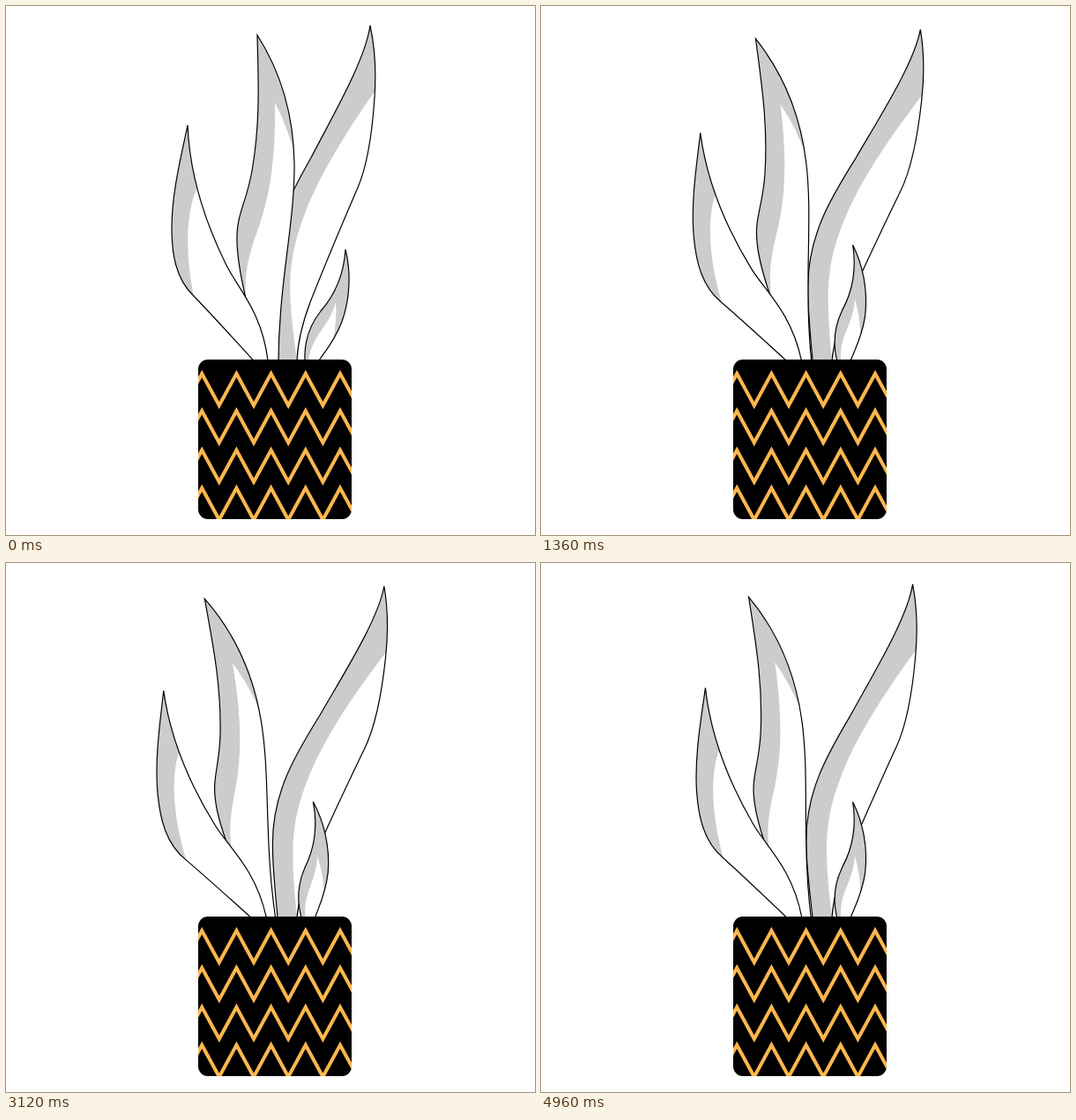
These frames come from a looping animation (600x600 px, 5 s). An HTML page:

```html
<!DOCTYPE html>
<html lang="en">
<head>
<meta charset="utf-8">
<title>Swaying plant</title>
<style>
  html, body { margin: 0; width: 100%; height: 100%; overflow: hidden; background: #fff; }
  svg { display: block; width: 100vw; height: 100vh; }
  .shade { fill: #ccc; }
  .light { fill: #fff; }
  .line { fill: none; stroke: #000; stroke-width: 1.2; }
  .zigzag { fill: none; stroke: #ffb74d; stroke-width: 4; stroke-miterlimit: 10; }
</style>
</head>
<body>
<svg viewBox="0 0 600 600">
  <defs>
    <clipPath id="pot"><rect x="218" y="401" width="174" height="181" rx="11"/></clipPath>
  </defs>
  <g id="leaves"></g>
  <g id="vase" clip-path="url(#pot)"><rect x="218" y="401" width="174" height="181"/></g>
</svg>
<script>
const LOOP = 5000, STEP = 40;

// Back to front. Each leaf swings linearly to `angle` at `peak` ms and back by `period` ms.
const leaves = [
  {
    pivot: [320, 402], angle: 3.2, peak: 1165, period: 2245,
    outline: 'M413 22C418 45 420 75 418 104C415 150 408 185 399 206C380 250 360 298 345 336' +
      'C336 360 331 380 330 402L330 410L309 410C306 385 300 350 299 320' +
      'C296 262 320 218 346 172C372 122 408 60 413 22Z',
    light: 'M418 97C383 147 352 198 337 241C317 295 320 330 330 402L420 402L440 97Z'
  },
  {
    pivot: [304, 424], angle: -9.1, peak: 1010, period: 2076,
    outline: 'M285 33C306 66 326 115 327 178C328 250 307 320 309 424L297 424' +
      'C285 380 261 305 262 262C262 235 273 222 279 187C289 130 286 80 285 33Z',
    light: 'M305 110C306 175 299 215 287 250C276 280 270 300 272 332L290 430L340 430' +
      'L345 164L326 164C321 144 313 125 305 110Z'
  },
  {
    pivot: [292, 420], angle: -6.5, peak: 1160, period: 2125,
    outline: 'M206 135C208 185 221 235 249 292C261 318 290 345 297 402L299 420L297 420' +
      'C268 388 240 357 213 329C192 309 188 280 188 252C188 210 200 165 206 135Z',
    light: 'M216 208C203 238 204 285 213 330L240 430L330 430L330 208Z'
  },
  {
    pivot: [346.5, 416], angle: -15.7, peak: 1200, period: 2000,
    outline: 'M385 276C391 300 391 330 381 358C373 379 362 392 355 402L347 416L340 416' +
      'C337 392 339 369 357 346C371 330 383 308 385 276Z',
    light: 'M374 336C370 352 360 364 353 375C346 386 342 398 343 415L357 415L371 379' +
      'C374 365 375 350 374 336Z'
  }
];

function add(parent, tag, attrs) {
  const el = document.createElementNS('http://www.w3.org/2000/svg', tag);
  for (const key in attrs) el.setAttribute(key, attrs[key]);
  return parent.appendChild(el);
}

const bed = document.getElementById('leaves');
leaves.forEach((leaf, i) => {
  const g = leaf.group = add(bed, 'g', {});
  const clip = add(g, 'clipPath', { id: 'leaf' + i });
  add(clip, 'path', { d: leaf.outline });
  add(g, 'path', { d: leaf.outline, class: 'shade' });
  add(g, 'path', { d: leaf.light, class: 'light', 'clip-path': `url(#leaf${i})` });
  add(g, 'path', { d: leaf.outline, class: 'line' });
});

const vase = document.getElementById('vase');
for (const top of [417, 459.2, 503.8, 546.8]) {
  const points = [];
  for (let i = -1; i < 10; i++) {
    points.push([222.2 + i * 19.6, top + (i % 2 ? 36 : 0)]);
  }
  add(vase, 'polyline', { points: points.join(' '), class: 'zigzag' });
}

function sway(t, { peak, period }) {
  const p = t % period;
  return p < peak ? p / peak : (period - p) / (period - peak);
}

function draw(time) {
  const t = Math.floor((time % LOOP) / STEP) * STEP;
  for (const leaf of leaves) {
    const turn = leaf.angle * sway(t, leaf);
    leaf.group.setAttribute('transform', `rotate(${turn} ${leaf.pivot.join(' ')})`);
  }
}

const start = performance.now();
function tick() {
  draw(performance.now() - start);
  requestAnimationFrame(tick);
}
tick();
</script>
</body>
</html>
```
